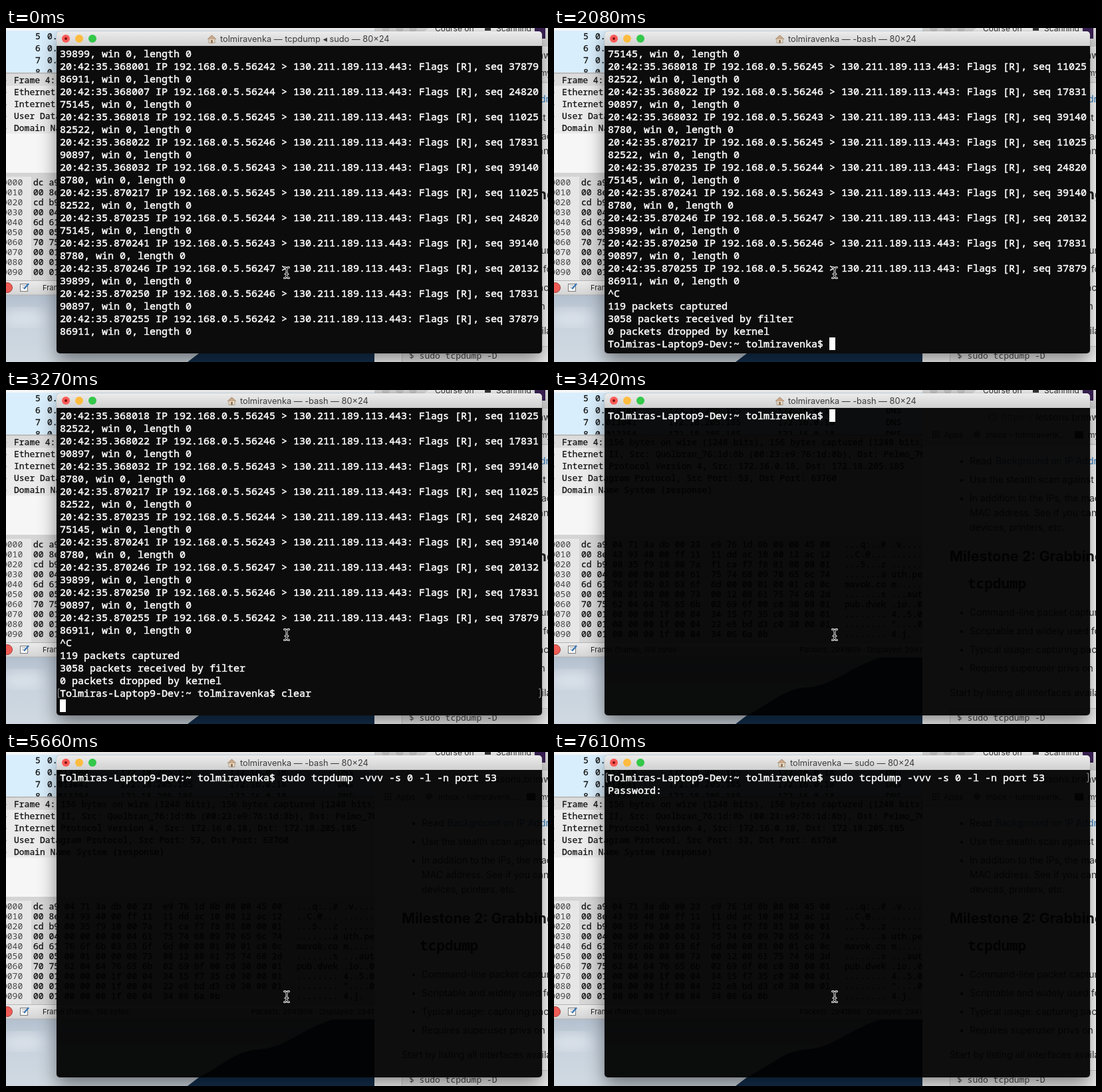
An HTML page for the animation above (8 s loop, 815 by 503 pixels).

```html
<!DOCTYPE html>
<html lang="en">
<head>
<meta charset="utf-8">
<title>Terminal session</title>
<style>
  html, body { margin: 0; width: 100%; height: 100%; overflow: hidden; background: #fff; }
  #stage { position: relative; width: 815px; height: 503px; overflow: hidden; }
  svg { position: absolute; left: 0; top: 0; }
  text { white-space: pre; }
  .mono { font: 13px "Noto Sans Mono", "DejaVu Sans Mono", monospace; fill: #111; stroke: #111; stroke-width: .3px; }
  .page { font: 14px Inter, "Liberation Sans", sans-serif; fill: #333; }
  .small { font: 11px Inter, "Liberation Sans", sans-serif; fill: #222; }
  .bar { font: 12px Inter, "Liberation Sans", sans-serif; fill: #333; }
  .url { font-size: 14px; }
  .link { fill: #2f7fc4; }
  .soft { fill: #888; stroke: none; }
  .dim { fill: #444; stroke: none; }
  .head { font: bold 21.5px Inter, "Liberation Sans", sans-serif; fill: #222; }
  .code { font: bold 21px "Noto Sans Mono", "DejaVu Sans Mono", monospace; fill: #222; }
  #win {
    position: absolute; left: 76px; top: 5px; width: 730px; height: 485px;
    border-radius: 5px; overflow: hidden;
    box-shadow: 0 0 1px rgba(0,0,0,.6), 0 12px 28px rgba(0,0,0,.45);
  }
  #win .top { height: 22px; background: linear-gradient(#ececec, #d0d0d0); }
  #win .body { height: 463px; background: #0c0c0c; }
  #win.clear .body { background: rgba(0,0,0,.945); }
  .term {
    font: 500 15px "Noto Sans Mono", "DejaVu Sans Mono", monospace;
    fill: #fff; stroke: #fff; stroke-width: .5px;
  }
  #title { font: 12.8px Inter, "Liberation Sans", sans-serif; fill: #3c3c3c; }
</style>
</head>
<body>
<div id="stage">
  <svg id="desk" width="815" height="503">
    <defs>
      <clipPath id="listClip"><rect width="554" height="67"/></clipPath>
      <clipPath id="appClip"><rect width="554" height="402"/></clipPath>
      <linearGradient id="sky" x2="0" y2="1">
        <stop offset="0" stop-color="#b3bfcd"/><stop offset=".35" stop-color="#c8d2de"/>
        <stop offset="1" stop-color="#d0d9e1"/>
      </linearGradient>
      <linearGradient id="status" x2="0" y2="1">
        <stop offset="0" stop-color="#ececec"/><stop offset="1" stop-color="#d4d4d4"/>
      </linearGradient>
      <filter id="blur"><feGaussianBlur stdDeviation="9"/></filter>
    </defs>

    <!-- wallpaper -->
    <rect y="402" width="554" height="101" fill="url(#sky)"/>
    <ellipse cx="26" cy="436" rx="30" ry="13" fill="#e6ebf0" opacity=".6" filter="url(#blur)"/>
    <path d="M273 503 L290 490 C330 470 345 450 380 448 C420 445 440 420 490 403 H554 V503Z" fill="#13304e"/>

    <!-- packet inspector -->
    <rect width="554" height="402" fill="#f6f6f6"/>
    <rect y="4" width="554" height="63" fill="#d9eefc"/>
    <rect y="67" width="554" height="2" fill="#bdbdbd"/>
    <rect y="69" width="554" height="90" fill="#ebebeb"/>
    <rect y="69" width="554" height="18" fill="#dcdcdc"/>
    <rect y="218" width="554" height="6" fill="#d4d4d4"/>
    <rect y="224" width="554" height="156" fill="#d6d6d6"/>
    <rect y="224" width="38" height="156" fill="#e6e6e6"/>
    <rect y="380" width="554" height="22" fill="url(#status)"/>
    <path d="M0 380.5H554M0 402H554" stroke="#b4b4b4"/>
    <g id="list" clip-path="url(#listClip)"></g>
    <g id="tree" clip-path="url(#appClip)"></g>
    <circle cx="2" cy="391" r="7.5" fill="#ee5c55" stroke="#a8423d"/>
    <rect x="21.500" y="385.500" width="11" height="11" fill="#fff" stroke="#777"/>
    <path d="M24 388h5M24 391h3" stroke="#999"/>
    <path d="M27 393l7-8" stroke="#3b78b5" stroke-width="2.500"/>

    <!-- browser -->
    <rect x="554" width="261" height="503" fill="#fff"/>
    <rect x="554" width="261" height="28" fill="#d6d6d6"/>
    <rect x="554" y="28" width="261" height="54" fill="#f1f1f1"/>
    <g fill="#c2c2c2"><circle cx="571" r="6"/><circle cx="592" r="6"/><circle cx="612" r="6"/></g>
    <path d="M627 7l8-7H790l8 7z" fill="#f1f1f1"/>
    <rect x="720" y="-5" width="9" height="9" fill="#333"/>
    <rect x="795" width="16" height="16" fill="#382052"/>
    <path d="M554 82H815" stroke="#c4c4c4"/>
    <circle cx="660" cy="41" r="5.500" fill="none" stroke="#555"/>
    <path d="M660 40v4M660 37.500v1" stroke="#555"/>
    <g id="apps" fill="#555"></g>
    <circle cx="636" cy="67" r="5" fill="#777"/>
    <rect x="783" y="62" width="13" height="11" fill="#333"/>
    <rect x="595.500" y="479.500" width="230" height="30" fill="#f2f2f2" stroke="#d0d0d0"/>
    <g id="web"></g>
  </svg>

  <div id="win"><div class="top"></div><div class="body"></div></div>

  <svg id="front" width="815" height="503">
    <circle cx="90" cy="16" r="6" fill="#fc5b57"/>
    <circle cx="90" cy="16" r="2" fill="#7c0f0c"/>
    <circle cx="110" cy="16" r="6" fill="#fdbc40"/>
    <circle cx="130" cy="16" r="6" fill="#34c84a"/>
    <g id="home">
      <path d="M2 6V12.500H11V6" fill="#e8dcc8" stroke="#a89a86"/>
      <path d="M0 7L6.500 1L13 7" fill="#c9a98c" stroke="#a58468"/>
      <rect x="5" y="8" width="3" height="4.500" fill="#96785c"/>
    </g>
    <text id="title" y="21"></text>
    <g id="rows"></g>
    <rect id="cursor" width="9" height="19" fill="#fff"/>
    <path id="marks" d="M81 3h-2.500v13h2.500M801 3h2.500v13h-2.500" fill="none" stroke="#9a9a9a"/>
    <g id="key" fill="none" stroke="#b5b5b5" stroke-width="2">
      <circle cx="167" cy="57.500" r="3.500"/><path d="M170.500 57.500H177M173 58v3M176 58v3"/>
    </g>
    <g fill="none" stroke-linecap="round">
      <path id="beam" d="M418.500 360.500Q422 360.500 422 364V373Q422 376.500 418.500 376.500M425.500 360.500Q422 360.500 422 364M422 373Q422 376.500 425.500 376.500M420 370.500H424" stroke="#e8e8e8" stroke-width="3"/>
    </g>
  </svg>
</div>

<script>
const $ = id => document.getElementById(id);
const NS = 'http://www.w3.org/2000/svg';

function put(parent, cls, x, y, str) {
  const el = document.createElementNS(NS, 'text');
  el.setAttribute('class', cls);
  el.setAttribute('x', x);
  el.setAttribute('y', y);
  el.textContent = str;
  $(parent).append(el);
  return el;
}

// dark centre of the pointer, same path with a thinner line
const core = $('beam').cloneNode();
core.id = 'core';
core.setAttribute('stroke', '#111');
core.setAttribute('stroke-width', 1);
$('beam').after(core);

// packet list
['0.012116', '0.012788', '0.013041', '0.013354'].forEach((time, i) => {
  const y = 17 + i * 18;
  [[44, i + 5], [62, time], [172, '172.18.205.185'], [336, '172.16.0.18'], [499, 'DNS']]
    .forEach(([x, s]) => put('list', 'mono', x, y, s));
});

// packet details
[
  'Frame 4: 156 bytes on wire (1248 bits), 156 bytes captured (1248 bits)',
  'Ethernet II, Src: Quolbran_76:1d:8b (00:23:e9:76:1d:8b), Dst: Pelmo_76',
  'Internet Protocol Version 4, Src: 172.16.0.18, Dst: 172.18.205.185',
  'User Datagram Protocol, Src Port: 53, Dst Port: 63760',
  'Domain Name System (response)'
].forEach((s, i) => {
  put('tree', 'mono', 12, 83 + i * 18, s);
  put('tree', 'small soft', -4, 82 + i * 18, '▸');
});

// hex view
const hex = s => [...s].map(c => c.charCodeAt(0).toString(16)).join(' ');
const answer = ip => `c0 30 00 01 00 01 00 00 00 1f 00 04 ${ip}`;
const bytes = [
  'dc a9 04 71 3a db 00 23 e9 76 1d 8b 08 00 45 00',
  '00 8e 43 93 40 00 ff 11 11 dd ac 10 00 12 ac 12',
  'cd b9 00 35 f9 10 00 7a f1 ca f7 f8 81 80 00 01',
  '00 04 00 00 00 00 04', hex('auth'), '09', hex('peltmavok'), '03', hex('com'),
  '00 00 01 00 01 c0 0c 00 05 00 01 00 00 00 73 00 12 08', hex('auth-pub'),
  '04', hex('dvek'), '02', hex('io'), '00',
  answer('34 15 f7 35'), answer('22 e8 bd d3'), answer('34 06 6a 0b')
].join(' ').split(' ');
const glyph = b => {
  const n = parseInt(b, 16);
  return n > 32 && n < 127 ? String.fromCharCode(n) : '.';
};
for (let r = 0; r < 10; r++) {
  const row = bytes.slice(r * 16, r * 16 + 16), y = 237 + r * 15;
  const halves = [row.slice(0, 8), row.slice(8)];
  put('tree', 'mono dim', -6, y, '00' + r + '0');
  put('tree', 'mono', 41, y, halves.map(h => h.join(' ')).join('  '));
  put('tree', 'mono', 437, y, halves.map(h => h.map(glyph).join('')).join(' '));
}
put('tree', 'small', 55, 395, 'Frame (frame), 156 bytes');
put('tree', 'small', 369, 395, 'Packets: 2941859 · Displayed: 2941859');

// browser
for (let i = 0; i < 9; i++) {
  const dot = document.createElementNS(NS, 'rect');
  dot.setAttribute('x', 569 + i % 3 * 4);
  dot.setAttribute('y', 62 + Math.floor(i / 3) * 4);
  dot.setAttribute('width', 2.5);
  dot.setAttribute('height', 2.5);
  $('apps').append(dot);
}
[
  ['bar', 645, 5, 'Course on'], ['bar', 737, 5, 'Scanning'],
  ['bar url soft', 673, 46, 'https://'], ['bar url', 724, 46, 'lessons.brimw'],
  ['bar', 586, 72, 'Apps'], ['bar', 650, 72, 'Inbox - tolmiravenk...'], ['bar', 803, 72, 'my'],
  ['page', 625, 168, 'In addition to the IPs, the machine'],
  ['page', 625, 190, 'MAC address. See if you can find'],
  ['page', 625, 212, 'devices, printers, etc.'],
  ['page', 625, 112, 'Read'], ['page link', 664, 112, 'Background on IP Address'],
  ['page', 625, 140, 'Use the stealth scan against all'],
  ['head', 595, 258, 'Milestone 2: Grabbing'], ['code', 622, 299, 'tcpdump'],
  ['page', 625, 340, 'Command-line packet capture'],
  ['page', 625, 368, 'Scriptable and widely used for'],
  ['page', 625, 396, 'Typical usage: capturing packets'],
  ['page', 625, 424, 'Requires superuser privs on most'],
  ['page', 595, 461, 'Start by listing all interfaces available'],
  ['mono dim', 606, 498, '$ sudo tcpdump -D']
].forEach(t => put('web', ...t));
[112, 140, 168, 340, 368, 396, 424].forEach(y => put('web', 'page', 609, y, '•'));

// terminal contents
const user = 'tolmiravenka';
const prompt = `Tolmiras-Laptop9-Dev:~ ${user}$ `;
const command = 'sudo tcpdump -vvv -s 0 -l -n port 53';
const seq = {
  56242: '37879 86911', 56243: '39140 8780', 56244: '24820 75145',
  56245: '11025 82522', 56246: '17831 90897', 56247: '20132 39899'
};
const rest = n => `${n}, win 0, length 0`;
const log = [rest(39899)];
[
  '368001 56242', '368007 56244', '368018 56245', '368022 56246', '368032 56243', '870217 56245',
  '870235 56244', '870241 56243', '870246 56247', '870250 56246', '870255 56242'
].forEach(s => {
  const [us, port] = s.split(' '), [a, b] = seq[port].split(' ');
  log.push(`20:42:35.${us} IP 192.168.0.5.${port} > 130.211.189.113.443: Flags [R], seq ${a}`, rest(b));
});
const done = [...log, '^C', '119 packets captured', '3058 packets received by filter',
  '0 packets dropped by kernel'];
const typing = n => ({ lines: [...done.slice(4), prompt + 'clear'.slice(0, n)], cur: [37 + n, 23] });
const titles = { run: [303, 'tcpdump ◂ sudo'], bash: [333, '-bash'], sudo: [336, 'sudo'] };

// each step changes part of the state at its time
const steps = [
  [0, { lines: log, title: 'run', cur: null, mark: -1, key: false, clear: false }],
  [150, { cur: [0, 23] }],
  [590, { cur: null }],
  [1040, typing(0)],
  [1190, { title: 'bash' }],
  [1640, { cur: null }],
  [2080, typing(0)],
  [2230, typing(1)],
  [2380, typing(2)],
  [2530, typing(3)],
  [2830, typing(4)],
  [3130, typing(5)],
  [3270, { lines: [...done.slice(5), prompt + 'clear'], cur: [0, 23], mark: 22 }],
  [3420, { lines: [prompt], cur: [37, 0], mark: -1, clear: true }],
  [4620, { cur: null }],
  [4920, { lines: [prompt + command], cur: [73, 0] }],
  [5660, { cur: null }],
  [6110, { cur: [73, 0] }],
  [6410, { lines: [prompt + command, 'Password:'], cur: null, mark: 0, key: true, title: 'sudo' }],
  [7610, { key: false }]
];

const rows = Array.from({ length: 24 }, (_, i) => put('rows', 'term', 81, 44 + i * 19, ''));
const toggle = (id, on) => $(id).style.visibility = on ? 'visible' : 'hidden';
const move = (id, x, y) => $(id).setAttribute('transform', `translate(${x} ${y})`);

function draw(s) {
  rows.forEach((el, i) => el.textContent = s.lines[i] || '');
  const [x, name] = titles[s.title];
  $('title').textContent = `${user} — ${name} — 80×24`;
  $('title').setAttribute('x', x + 19);
  move('home', x, 10);
  toggle('cursor', s.cur);
  if (s.cur) move('cursor', 81 + s.cur[0] * 9, 29 + s.cur[1] * 19);
  toggle('marks', s.mark >= 0);
  move('marks', 0, 29 + s.mark * 19);
  toggle('key', s.key);
  $('win').classList.toggle('clear', s.clear);
}

let shown = 0;
function tick() {
  const t = performance.now() % 8000;
  const past = steps.filter(([at]) => at <= t);
  if (past.length !== shown) {
    shown = past.length;
    draw(Object.assign({}, ...past.map(p => p[1])));
  }
  requestAnimationFrame(tick);
}
tick();
</script>
</body>
</html>
```
